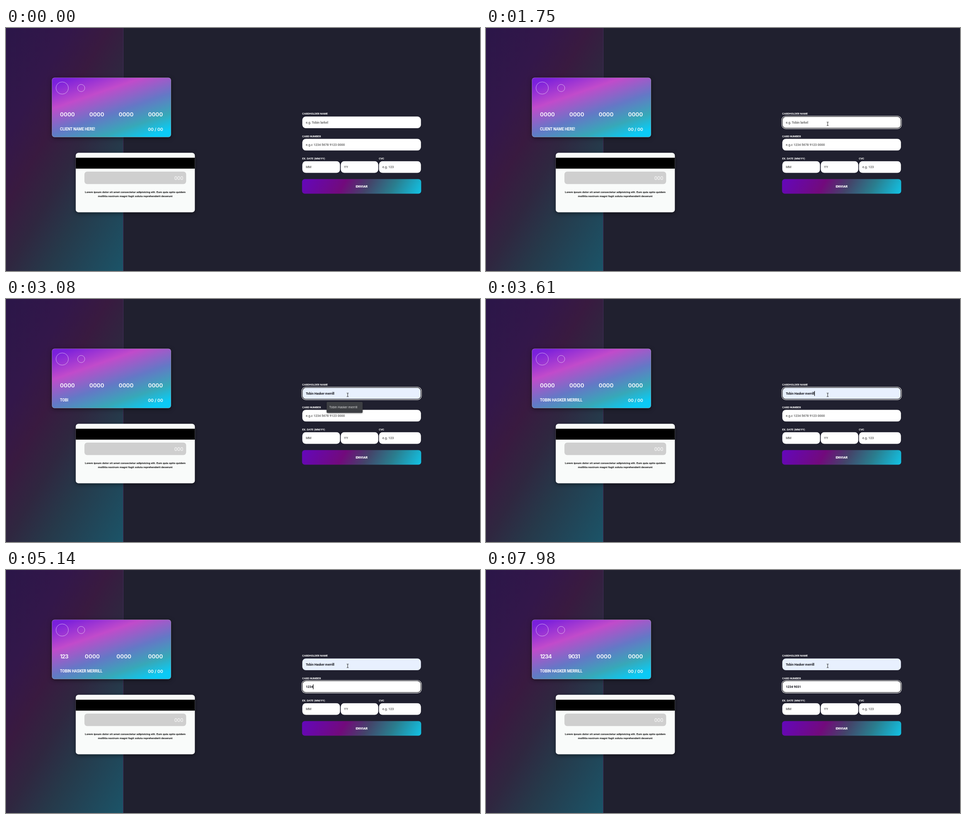
Animation, 1045 px wide and 536 px high, one loop 8 s. Source, as an HTML page:

```html
<!DOCTYPE html>
<html lang="en">
<head>
<meta charset="utf-8">
<title>Card form</title>
<style>
  html, body { margin: 0; width: 100%; height: 100%; overflow: hidden; background: #20202f; }
  body { position: relative; }
  #stage {
    position: absolute; left: 0; top: 0; width: 1910px; height: 980px; transform-origin: 0 0;
    font: 600 13px/22px Roboto, sans-serif; color: #fff;
  }
  #stage * { box-sizing: border-box; }
  .box, .text { position: absolute; }
  .text { white-space: pre; }
  .panel {
    border-right: 1px solid #5a3575;
    background: linear-gradient(120deg, #2b1648, #33174a 25%, #391a40 40%, #2f2740 55%, #26394a 70%, #1b5468);
  }
  .floor { background: #1b1a28; }
  .card { border-radius: 11px; box-shadow: 0 4px 18px rgba(0, 0, 0, .5); }
  .front {
    border: 1px solid rgba(255, 255, 255, .5);
    background: linear-gradient(161deg, #7a20dc 6%, #c14bcb 31%, #6478c6 56%, #37a8b8 76%, #0bcaf5 92%) border-box;
  }
  .back { background: #f9fbfa; }
  .stripe { background: #000; }
  .code { background: #cfcfcf; border-radius: 11px; }
  .ring { border: 1px solid #fff; border-radius: 50%; }
  .groups { display: flex; justify-content: space-between; font: 600 22.7px/29px Inter, sans-serif; }
  .groups .typed { letter-spacing: -1.8px; }
  .holder { font-size: 15.4px; letter-spacing: -.2px; }
  .expiry { font: 600 17.2px/22px Inter, sans-serif; }
  .cvc { font: 400 19.2px/22px Inter, sans-serif; }
  .legal { color: #111; font-size: 11.4px; line-height: 16.4px; text-align: center; transform: translateX(-50%); }
  .label { font-weight: 700; font-size: 11px; letter-spacing: -.1px; }
  .field { background: #fff padding-box; border: 1px solid transparent; border-radius: 15px; }
  .field.focus { border: 2px solid #0c0c12; box-shadow: 0 0 0 2px #fff; }
  .field.filled { background-color: #e8f0fe; }
  .value { color: #15151c; letter-spacing: -.15px; }
  .hint { color: #707070; }
  .caret { display: inline-block; width: 2px; height: 20px; margin-right: -2px; background: #000; vertical-align: middle; }
  .button {
    border-radius: 11px;
    background: linear-gradient(120deg, #6407bc, #720a7c 35%, #43456a 55%, #2a7d8e 75%, #12c3e6);
    font: 800 13.5px/59px Roboto, sans-serif; text-align: center;
  }
  .popup {
    background: #27282b; border-radius: 4px; color: #eee; padding-left: 11px;
    box-shadow: 0 2px 6px rgba(0, 0, 0, .4); font: 400 12px/44px "Open Sans", sans-serif; white-space: pre;
  }
  .popup.active { background: #3d3f43; }
  svg { position: absolute; left: 0; top: 0; overflow: visible; }
</style>
</head>
<body>
<div id="stage"></div>
<svg width="1" height="1">
  <path id="arrow" d="M0 0V9.5L2.3 7.5L3.8 11L5.3 10.3L3.8 7H6.8Z" fill="#fff" stroke="#000" stroke-width=".7"/>
  <path id="beam" d="M-2 -4H-.5L0 -3.5L.5 -4H2M0 -3.5V3.5M-2 4H-.5L0 3.5L.5 4H2" fill="none" stroke="#222"/>
</svg>
<script>
const LOOP = 8000;
const NAME = "Tobin Hasker merrill";

// The page is laid out 1910 px wide and shown reduced; helpers take shown coordinates.
const SCALE = 1045 / 1910;
const stage = document.getElementById("stage");
stage.style.transform = `scale(${SCALE})`;

function add(className, style, text = "") {
  const el = document.createElement("div");
  el.className = className;
  el.textContent = text;
  for (const key in style) el.style[key] = style[key] / SCALE + "px";
  stage.append(el);
  return el;
}
const box = (cls, left, top, width, height, text) =>
  add("box " + cls, { left, top, width, height }, text);
// Places a line of text by its left edge and vertical centre.
const text = (cls, left, middle, content) =>
  add("text " + cls, { left, top: middle - 6 }, content);

box("floor", 0, 535, 1045, 1);
box("panel", 0, 0, 259, 536);

box("card front", 101.2, 109.4, 262.6, 131.3);
box("ring", 110.2, 118.6, 27.5, 27.5);
box("ring", 157.4, 124, 16.5, 16.5);
const groups = box("groups", 119, 183, 227, 16);
const groupEls = Array.from({ length: 4 }, () => groups.appendChild(document.createElement("span")));
const holder = text("holder", 119, 223);
text("expiry", 313, 223, "00 / 00");

box("card back", 153.7, 275.4, 262.6, 131.3);
box("stripe", 153.7, 286, 262.6, 24.3);
box("code", 173, 317, 224, 27);
text("cvc", 371, 331, "000");
text("legal", 285, 363,
  "Lorem ipsum dolor sit amet consectetur adipisicing elit. Eum quia optio quidem\n" +
  "mollitia nostrum magni fugit soluta reprehenderit deserunt");

text("label", 653, 190, "CARDHOLDER NAME");
text("label", 653, 239.5, "CARD NUMBER");
text("label", 653, 288.5, "EX. DATE (MM/YY)");
text("label", 822, 288.5, "CVC");

const FIELDS = [
  ["name", 652.9, 194.9, 262.5, "e.g. Tobin larkel"],
  ["number", 652.9, 244.1, 262.5, "e.g.c 1234 5678 9123 0000"],
  ["month", 652.9, 293.3, 84, "MM"],
  ["year", 737.3, 293.3, 84, "YY"],
  ["cvc", 821.7, 293.3, 93.7, "e.g. 123"],
].map(([id, x, y, w, hint]) => ({
  id, x, y, w, hint,
  el: box("field", x, y, w, 26.7),
  label: text("value", x + 8, y + 13.4),
}));

box("button", 652.9, 333.4, 262.5, 32, "ENVIAR");
const popup = box("popup", 707, 227, 79, 24, NAME);

const arrow = document.getElementById("arrow");
const beam = document.getElementById("beam");

// Each step changes only the listed parts of the state.
const START = { focus: "", name: "", holder: "Client name here!", number: "", groups: ["0000", "0000"], caret: true, popup: "", filled: false };
const STEPS = [
  [1220, { focus: "name" }],
  [1750, { caret: false }],
  [1950, { caret: true, name: NAME.slice(0, 1), holder: NAME.slice(0, 1), popup: "open" }],
  [2280, { name: NAME.slice(0, 2), holder: NAME.slice(0, 2) }],
  [2480, { name: NAME.slice(0, 3), holder: NAME.slice(0, 3) }],
  [2610, { name: NAME.slice(0, 4) }],
  [2670, { holder: NAME.slice(0, 4) }],
  [3080, { name: NAME, filled: true, popup: "active", caret: false }],
  [3400, { holder: NAME, popup: "", caret: true }],
  [3810, { focus: "number" }],
  [4010, { groups: ["", "0000"] }],
  [4340, { caret: false }],
  [4410, { caret: true, number: "1" }],
  [4610, { number: "12", groups: ["1", "0000"] }],
  [4810, { number: "123", groups: ["12", "0000"] }],
  [5010, { number: "1234", groups: ["123", "0000"] }],
  [5210, { number: "1234 ", groups: ["1234", "0000"] }],
  [5810, { caret: false }],
  [6210, { caret: true, number: "1234 9" }],
  [6340, { groups: ["1234", "9"] }],
  [6470, { number: "1234 90" }],
  [6600, { groups: ["1234", "90"] }],
  [6860, { number: "1234 903" }],
  [6930, { groups: ["1234", "903"] }],
  [7330, { number: "1234 9031" }],
  [7460, { groups: ["1234", "9031"] }],
  [7980, { caret: false }],
];

function pointerAt(t) {
  if (t < 130) return null;
  if (t < 1010) {
    const p = Math.min(10, Math.floor((t - 130) / 75)) / 10;
    const eased = 1 - (1 - p) ** 1.6;
    return [1012 - 261 * eased, 523 - 302 * eased];
  }
  if (t < 1080) return [751, 214];
  if (t < 1220) return [751.5, 211.5];
  return [753.3, 211.5];
}

function drawPointer(t) {
  const pos = pointerAt(t);
  const overField = pos && FIELDS.some(f =>
    pos[0] >= f.x && pos[0] <= f.x + f.w && pos[1] >= f.y && pos[1] <= f.y + 27);
  arrow.style.display = pos && !overField ? "" : "none";
  beam.style.display = overField ? "" : "none";
  if (pos) for (const el of [arrow, beam]) el.setAttribute("transform", `translate(${pos})`);
}

function drawField(field, state) {
  const value = state[field.id] || "";
  const focused = state.focus === field.id;
  field.el.classList.toggle("focus", focused);
  field.el.classList.toggle("filled", field.id === "name" && state.filled);
  field.label.classList.toggle("hint", !value);
  field.label.textContent = value || field.hint;
  if (focused && state.caret) {
    const caret = document.createElement("span");
    caret.className = "caret";
    field.label[value ? "append" : "prepend"](caret);
  }
}

let shown = -1;
function render(t) {
  drawPointer(t);
  const count = STEPS.filter(([time]) => time <= t).length;
  if (count === shown) return;
  shown = count;
  const state = Object.assign({}, START, ...STEPS.slice(0, count).map(step => step[1]));
  FIELDS.forEach(field => drawField(field, state));
  holder.textContent = state.holder.toUpperCase();
  groupEls.forEach((el, i) => {
    el.textContent = state.groups[i] ?? "0000";
    el.className = el.textContent === "0000" ? "" : "typed";
  });
  popup.style.display = state.popup ? "" : "none";
  popup.classList.toggle("active", state.popup === "active");
}

const begin = performance.now();
function tick() {
  render((performance.now() - begin) % LOOP);
  requestAnimationFrame(tick);
}
tick();
</script>
</body>
</html>
```
